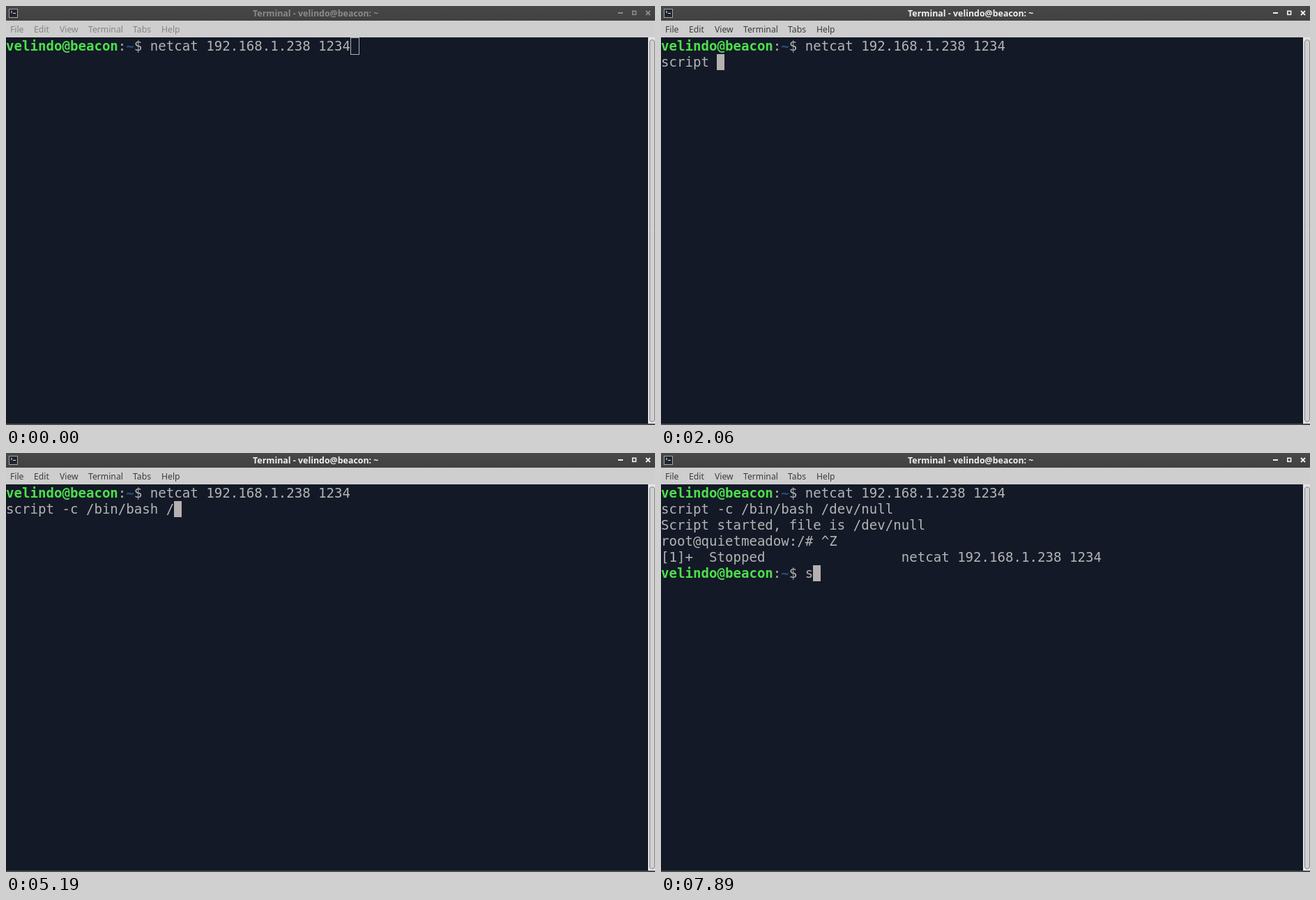
An HTML page with a canvas for the animation above (8 s loop, 931x601 px).

```html
<!DOCTYPE html>
<html lang="en">
<head>
<meta charset="utf-8">
<title>Terminal session</title>
<style>
html, body { margin: 0; width: 100%; height: 100%; overflow: hidden; background: #131926; }
canvas { display: block; }
</style>
</head>
<body>
<canvas id="stage" width="931" height="601"></canvas>
<script>
const ctx = document.getElementById('stage').getContext('2d', { alpha: false });

const LOOP = 8000;
const FOCUS = 370, ENTER = 750, RUN = 6600, SHELL = 6640, STOP = 7450, LAST_KEY = 7890;

const CELL = 11.49, ROW = 23, TOP = 46, BASELINE = 18;
const MONO = '19.1px "DejaVu Sans Mono", monospace';
const SANS = '"Noto Sans", "Open Sans", sans-serif';
const INK = '#b3b3b3', GREEN = '#4ce04a', BLUE = '#2d4f7f', BACK = '#131926';

const USER = 'velindo@beacon';
const COMMAND = 'netcat 192.168.1.238 1234';
const PROMPT_COLS = USER.length + 4;
const ROOT_PROMPT = 'root@quietmeadow:/# ';
const MENU = [['File', 6], ['Edit', 40], ['View', 77], ['Terminal', 118], ['Tabs', 182], ['Help', 223]];

// Bursts of typing: first key, last key, characters.
const BURSTS = [
  [1640, 1640, 's'], [1760, 2060, 'cript '], [2500, 2500, '-'], [2810, 2880, 'c '],
  [3180, 3180, '/'], [3440, 3440, 'b'], [3520, 3550, 'in'], [3770, 4140, '/bash'],
  [4590, 4590, ' '], [5190, 5190, '/'], [5300, 5480, 'dev'], [5630, 6000, '/null']
];

function typed(t) {
  let out = '';
  for (const [from, to, text] of BURSTS) {
    if (t < from) break;
    const gap = (to - from) / Math.max(1, text.length - 1);
    const count = gap ? Math.floor((t - from) / gap + 1e-6) + 1 : text.length;
    out += text.slice(0, count);
  }
  return out;
}

function box(color, x, y, w, h) {
  ctx.fillStyle = color;
  ctx.fillRect(x, y, w, h);
}

function label(text, x, y, font, color) {
  ctx.font = font;
  ctx.fillStyle = color;
  ctx.fillText(text, x, y);
}

function write(text, col, row, color = INK, bold = false) {
  const font = (bold ? 'bold ' : '') + MONO;
  [...text].forEach((ch, i) => {
    if (ch !== ' ') label(ch, (col + i) * CELL, TOP + row * ROW + BASELINE, font, color);
  });
}

function prompt(row, text) {
  write(USER, 0, row, GREEN, true);
  write(':', USER.length, row);
  write('~', USER.length + 1, row, BLUE, true);
  write('$', USER.length + 2, row);
  write(text, PROMPT_COLS, row);
}

function cursor(col, row, active) {
  const x = Math.round(col * CELL), y = TOP + row * ROW;
  if (active) {
    box('#b5b1b1', x, y, 11, ROW);
  } else {
    ctx.strokeStyle = '#b0b0b0';
    ctx.lineWidth = 1;
    ctx.strokeRect(x + .5, y - .5, 12, 24);
  }
}

function titleBar(active) {
  const color = active ? '#f0f0f0' : '#8b8b8b';
  const shade = ctx.createLinearGradient(0, 0, 0, 21);
  shade.addColorStop(0, '#484848');
  shade.addColorStop(1, '#414141');
  box(shade, 0, 0, 931, 21);

  box('#a5a5a5', 4, 4, 13, 13);
  box('#20252b', 5, 5, 11, 11);
  ctx.strokeStyle = '#e4e4e4';
  ctx.lineWidth = 1;
  ctx.beginPath();
  ctx.moveTo(7, 7);
  ctx.lineTo(9, 8.5);
  ctx.lineTo(7, 10);
  ctx.moveTo(10, 10.5);
  ctx.lineTo(14, 10.5);
  ctx.stroke();

  label(`Terminal - ${USER}: ~`, 354, 15, `bold 12.4px ${SANS}`, color);

  box(color, 878, 9, 7, 2);
  ctx.strokeStyle = color;
  ctx.lineWidth = 1.6;
  ctx.strokeRect(898.8, 7.3, 4.8, 5);
  ctx.lineWidth = 1.8;
  ctx.beginPath();
  ctx.moveTo(918, 7);
  ctx.lineTo(924, 13);
  ctx.moveTo(924, 7);
  ctx.lineTo(918, 13);
  ctx.stroke();
}

function menuBar(active) {
  box('#cecece', 0, 21, 931, 24);
  for (const [name, x] of MENU) label(name, x, 38, `12.2px ${SANS}`, active ? '#3c3c3c' : '#858585');
}

function frame() {
  box('#e6e6e6', 921, 45, 10, 554);
  ctx.beginPath();
  ctx.roundRect(923.5, 48.5, 7, 548, 3.5);
  ctx.fillStyle = '#d0d0d0';
  ctx.fill();
  ctx.strokeStyle = '#858585';
  ctx.lineWidth = 1;
  ctx.stroke();
  box('#484a4d', 0, 599, 931, 2);
}

function session(t) {
  prompt(0, COMMAND);
  if (t < ENTER) return cursor(PROMPT_COLS + COMMAND.length, 0, t >= FOCUS);

  const line = typed(t);
  write(line, 0, 1);
  if (t < RUN) return cursor(line.length, 1, true);

  write('Script started, file is /dev/null', 0, 2);
  if (t < SHELL) return cursor(0, 3, true);

  write(ROOT_PROMPT, 0, 3);
  if (t < STOP) return cursor(ROOT_PROMPT.length, 3, true);

  write('^Z', ROOT_PROMPT.length, 3);
  write('[1]+  Stopped', 0, 4);
  write(COMMAND, 30, 4);
  const next = t < LAST_KEY ? '' : 's';
  prompt(5, next);
  cursor(PROMPT_COLS + next.length, 5, true);
}

const start = performance.now();

function draw() {
  const t = Math.max(0, performance.now() - start) % LOOP;
  const active = t >= FOCUS;
  box(BACK, 0, 0, 931, 601);
  titleBar(active);
  menuBar(active);
  frame();
  session(t);
  requestAnimationFrame(draw);
}
draw();
</script>
</body>
</html>
```
